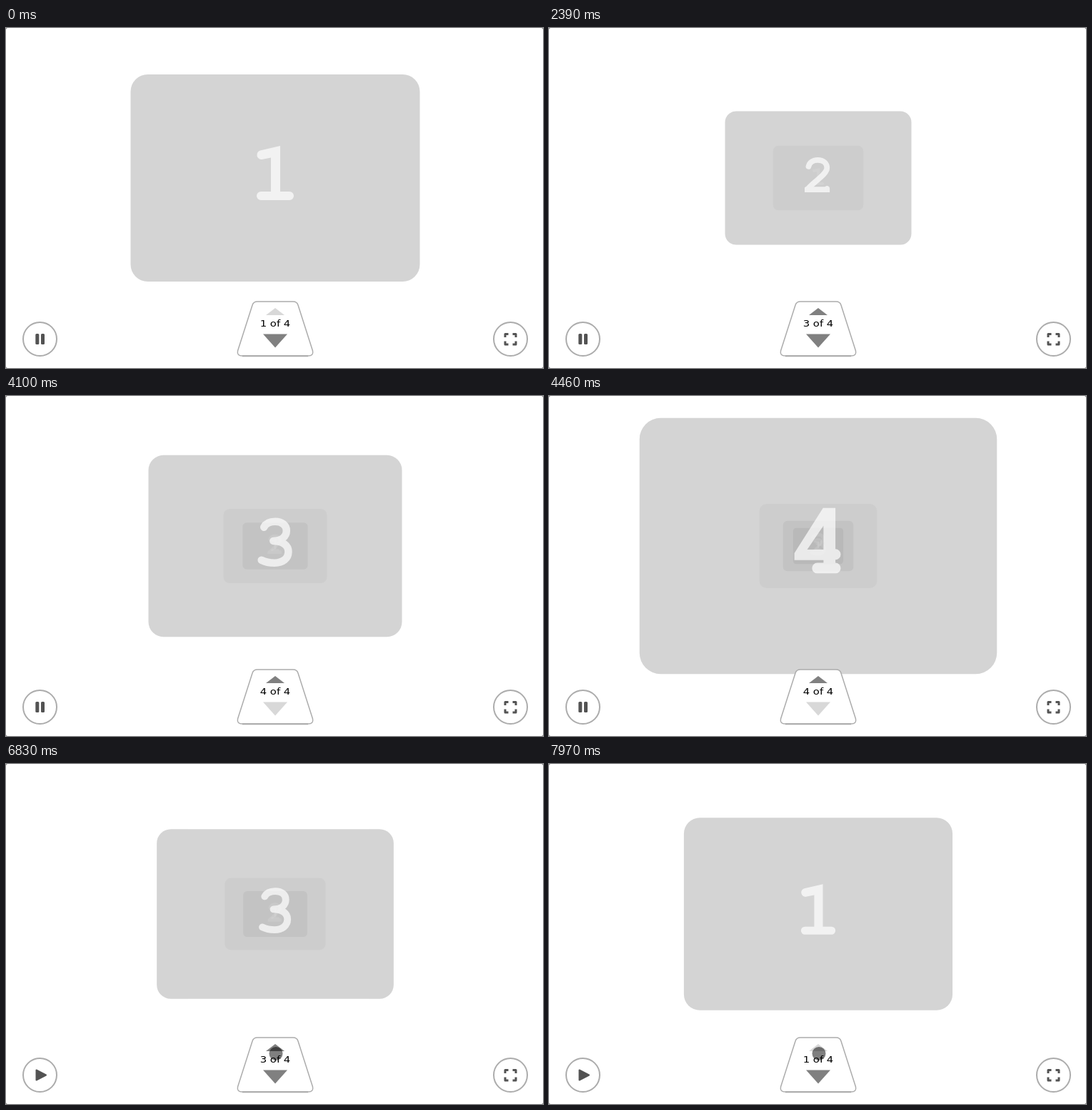
These frames come from a looping animation (752 by 476 pixels, 8 s). An HTML page:

```html
<!DOCTYPE html>
<html lang="en">
<head>
<meta charset="utf-8">
<title>Depth slideshow</title>
<style>
  html, body { margin: 0; width: 100%; height: 100%; overflow: hidden; background: #777; }
  svg { display: block; width: 100vw; height: 100vh; background: #fff; border-radius: 2.5px; }
  .button { fill: #fff; stroke: #acacac; stroke-width: 2; }
  .icon { fill: #535353; }
  .line { fill: none; stroke: #fff; stroke-width: 12; stroke-linecap: round; stroke-linejoin: round; }
  text { font: 14.8px "DejaVu Sans", sans-serif; text-anchor: middle; }
</style>
</head>
<body>
<svg viewBox="0 0 752 476">
  <g id="cards"></g>
  <g id="digits" fill="#fff">
    <g><path d="M384 165L356 171.5A6.4 6.4 0 0 0 358.5 184L371 181.5V229H357a6 6 0 0 0 0 12H397a6 6 0 0 0 0-12H384Z"/></g>
    <g>
      <path class="line" d="M356 185C358 176 366 171 376 171C388 171 396 178 396 188C396 203 368 217 355 233"/>
      <path d="M347.5 231V241H402V233a5.7 5.7 0 0 0-10-4H350Z"/>
    </g>
    <g><path class="line" d="M359 180C362 174 369 171 377 171C388 171 395 177 395 185.500C395 195 387 201.500 374 202C389 202 398 209 398 219C398 230 389 237 376 237C367 237 360 235 355 232.500"/></g>
    <g><path fill-rule="evenodd" d="M382.500 167H396.500V213.500a6 6 0 0 1 0 12V229a6 6 0 0 1 0 12H376a6 6 0 0 1 0-12H383V226H350V218ZM383 187L364.500 214H383Z"/></g>
  </g>

  <path fill="#fff" stroke="#acacac" stroke-width="1.5" d="M352 383H402Q407.500 383 409 388L429.500 452Q431 459 423 459H331Q323 459 324.500 452L345 388Q346.500 383 352 383Z"/>
  <path stroke="#acacac" stroke-width="2" d="M331 459.200H423"/>
  <path id="up" d="M364 402H390L377 392Z"/>
  <path id="down" d="M360 428.500H394L377 447.500Z"/>
  <text id="label" transform="translate(377 418) scale(1 .78)"></text>

  <circle class="button" cx="47.5" cy="435.5" r="23.5"/>
  <g id="pause" class="icon">
    <rect x="41.300" y="428" width="5" height="15" rx="1.5"/>
    <rect x="49" y="428" width="5" height="15" rx="1.5"/>
  </g>
  <path id="play" class="icon" stroke="#535353" stroke-width="2" stroke-linejoin="round" d="M42.500 428.500V442.500L56 435.500Z"/>
  <circle class="button" cx="706.5" cy="435.5" r="23.5"/>
  <path fill="none" stroke="#535353" stroke-width="3" stroke-linejoin="round" d="M699 433V428.500H703.500M709.500 428.500H714V433M714 438.500V443H709.500M703.500 443H699V438.500"/>

  <circle id="ripple" r="22.5" opacity=".15"/>
  <circle id="cursor" r="9.5" opacity=".5"/>
</svg>
<script>
const LOOP = 8000, STEP = 30, PHASE = 20;
const MOVE_TIME = 540, DEPTH_STEP = 1.65, PAUSE_AT = 5330;
const moves = [[472, 1], [2272, 2], [4072, 3], [6455, 2], [6988, 1], [7522, 0]];
const clicks = [PAUSE_AT, 6455, 6988, 7522];
const cursorPath = [
  { from: 4910, to: 5120, a: [68, 490], b: [51, 435], ease: u => 1 - (1 - u) ** 2 },
  { from: 5720, to: 6260, a: [51, 435], b: [378, 405.5], ease: u => u * u * (3 - 2 * u) }
];

const $ = id => document.getElementById(id);
const show = (el, on) => { el.style.display = on ? '' : 'none'; };
const clamp = (v, lo, hi) => Math.min(hi, Math.max(lo, v));

const digits = [...$('digits').children];
const cards = digits.map(() => {
  const card = document.createElementNS('http://www.w3.org/2000/svg', 'rect');
  const size = { x: 174.5, y: 65, width: 405, height: 290, rx: 24 };
  for (const key in size) card.setAttribute(key, size[key]);
  $('cards').prepend(card);   // the nearest card is painted first, tints go over it
  return card;
});

// cubic-bezier(0, 0, .58, 1)
function easeOut(x) {
  let lo = 0, hi = 1;
  for (let i = 0; i < 24; i++) {
    const s = (lo + hi) / 2;
    if (1.74 * s * s * (1 - s) + s ** 3 < x) lo = s; else hi = s;
  }
  return lo * lo * (3 - 2 * lo);
}

function positionAt(time) {
  let from = 0, to = 0, start = -MOVE_TIME;
  const at = t => from + (to - from) * easeOut(clamp((t - start) / MOVE_TIME, 0, 1));
  for (const [when, target] of moves) {
    if (when > time) break;
    from = at(when);
    to = target;
    start = when;
  }
  return { pos: at(time), target: to };
}

function drawSlides(pos) {
  const scales = cards.map((_, i) => 1 / (1 + DEPTH_STEP * (pos - i)));
  const front = scales.findLastIndex(s => s > 0 && s < 40);
  cards.forEach((card, i) => {
    const shown = i <= front, s = scales[i];
    const isFront = i === front;
    show(card, shown);
    show(digits[i], shown);
    if (!shown) return;
    const transform = `translate(377 210) scale(${s}) translate(-377 -210)`;
    card.setAttribute('transform', transform);
    digits[i].setAttribute('transform', transform);
    card.setAttribute('fill', isFront ? '#d4d4d4' : '#000');
    card.setAttribute('opacity', isFront ? 1 : clamp(0.01 + 0.02 * (pos - i), 0.03, 0.05));
    digits[i].setAttribute('opacity', isFront ? 0.7 : 0.1);
  });
}

function drawCursor(time) {
  const leg = cursorPath.findLast(l => time > l.from);
  const pressed = clicks.some(c => time >= c && time < c + 90);
  show($('cursor'), leg);
  show($('ripple'), leg && pressed);
  if (!leg) return;
  const k = leg.ease(clamp((time - leg.from) / (leg.to - leg.from), 0, 1));
  const [x, y] = leg.a.map((v, i) => v + (leg.b[i] - v) * k);
  for (const id of ['cursor', 'ripple']) $(id).setAttribute('transform', `translate(${x} ${y})`);
}

function draw(now) {
  const time = Math.floor((now % LOOP - PHASE) / STEP) * STEP + PHASE;
  const { pos, target } = positionAt(time);
  drawSlides(pos);
  drawCursor(time);
  $('label').textContent = `${target + 1} of ${cards.length}`;
  $('up').setAttribute('fill', target > 0 ? '#808080' : '#d8d8d8');
  $('down').setAttribute('fill', target < cards.length - 1 ? '#808080' : '#d8d8d8');
  show($('pause'), time < PAUSE_AT);
  show($('play'), time >= PAUSE_AT);
}

function tick() {
  draw(performance.now());
  requestAnimationFrame(tick);
}
tick();
</script>
</body>
</html>
```
